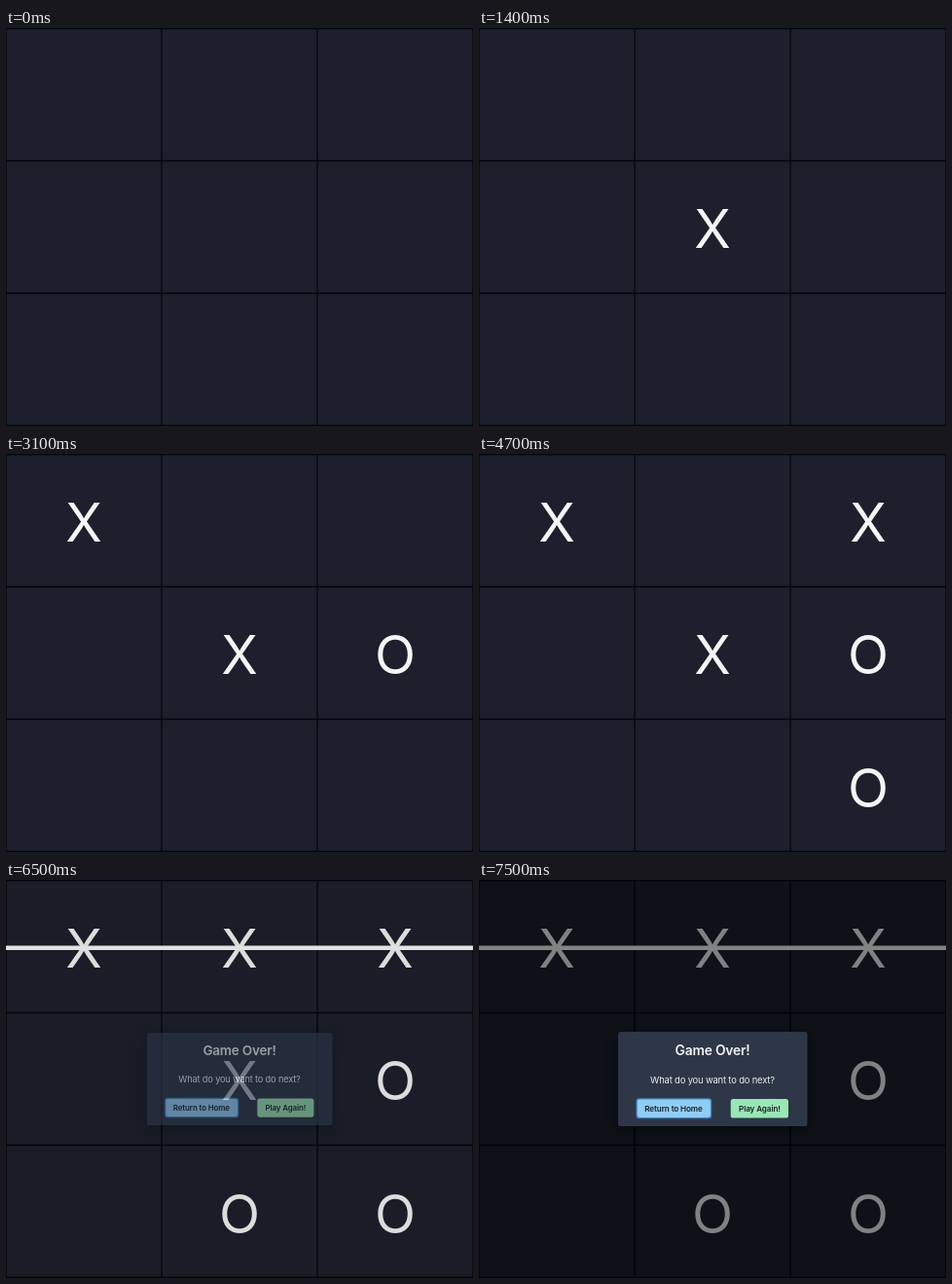
Animation of 480x409 px, one loop 7.6 s. Source, as an HTML page:

```html
<!DOCTYPE html>
<html lang="en">
<head>
<meta charset="utf-8">
<title>Tic-tac-toe</title>
<style>
  html, body { margin: 0; width: 100%; height: 100%; overflow: hidden; background: #1a202c; }
  svg { display: block; width: 100%; height: 100%; }
  text { font-family: Inter, sans-serif; text-anchor: middle; }
  #marks text { font-size: 55px; fill: #f4f6f5; }
  #dialog { transform-origin: 240px 204.5px; }
  .panel { fill: #2d3748; filter: drop-shadow(0 4px 7px rgba(0, 0, 0, .4)); }
  .title { font-size: 13.8px; font-weight: 600; letter-spacing: -.2px; fill: #f2f4f5; }
  .body { font-size: 9.4px; letter-spacing: -.15px; fill: #eeeff1; }
  .label { font-size: 8.1px; font-weight: 600; letter-spacing: -.1px; fill: #1a202c; }
</style>
</head>
<body>
<svg viewBox="0 0 480 409">
  <rect width="480" height="409" fill="#1b202c"/>
  <path d="M0 .5H480M0 136.5H480M0 272.5H480M0 408.5H480M0 0V409M160 0V409M320 0V409M480 0V409"
        stroke="#04060d" stroke-width="1.3"/>
  <g id="marks"></g>
  <rect id="strike" y="67.5" width="480" height="4.5" fill="#fafbfa"/>
  <rect id="shade" width="480" height="409"/>
  <g id="dialog">
    <rect class="panel" x="143" y="156" width="194.5" height="97" rx="2.6"/>
    <text class="title" x="240" y="179.5">Game Over!</text>
    <text class="body" x="240" y="208.5">What do you want to do next?</text>
    <rect x="161.4" y="224.2" width="77.8" height="21" rx="3.2" fill="#4283bd"/>
    <rect x="162.7" y="225.5" width="75.2" height="18.4" rx="2.4" fill="#90cdf4"/>
    <text class="label" x="200" y="238">Return to Home</text>
    <rect x="258.7" y="225" width="59.3" height="19.5" rx="2.6" fill="#9ae6b4"/>
    <text class="label" x="288.4" y="238">Play Again!</text>
  </g>
</svg>
<script>
const LOOP = 7600, END = 6500, STEP = 100;
// time, mark, column, row
const moves = [
  [1400, 'X', 1, 1], [2300, 'O', 2, 1], [3100, 'X', 0, 0], [3900, 'O', 2, 2],
  [4700, 'X', 2, 0], [5600, 'O', 1, 2], [END, 'X', 1, 0]
];
// shade opacity, dialog opacity, dialog scale
const fade = [[.1, .6, .979], [.45, .95, .998], [.472, .99, 1], [.48, 1, 1]];

const $ = id => document.getElementById(id);
const show = (el, opacity) => el.style.opacity = opacity;

const marks = moves.map(([time, mark, col, row]) => {
  const el = document.createElementNS('http://www.w3.org/2000/svg', 'text');
  el.setAttribute('x', 80 + 160 * col);
  el.setAttribute('y', 90 + 136.3 * row);
  el.textContent = mark;
  $('marks').append(el);
  return { el, time };
});

function draw() {
  const t = performance.now() % LOOP;
  for (const { el, time } of marks) show(el, t >= time ? 1 : 0);
  const step = Math.min(Math.floor((t - END) / STEP), fade.length - 1);
  const [shade, dialog, scale] = fade[step] || [0, 0, 1];
  show($('strike'), t >= END ? 1 : 0);
  show($('shade'), shade);
  show($('dialog'), dialog);
  $('dialog').style.transform = `scale(${scale})`;
  requestAnimationFrame(draw);
}
draw();
</script>
</body>
</html>
```
